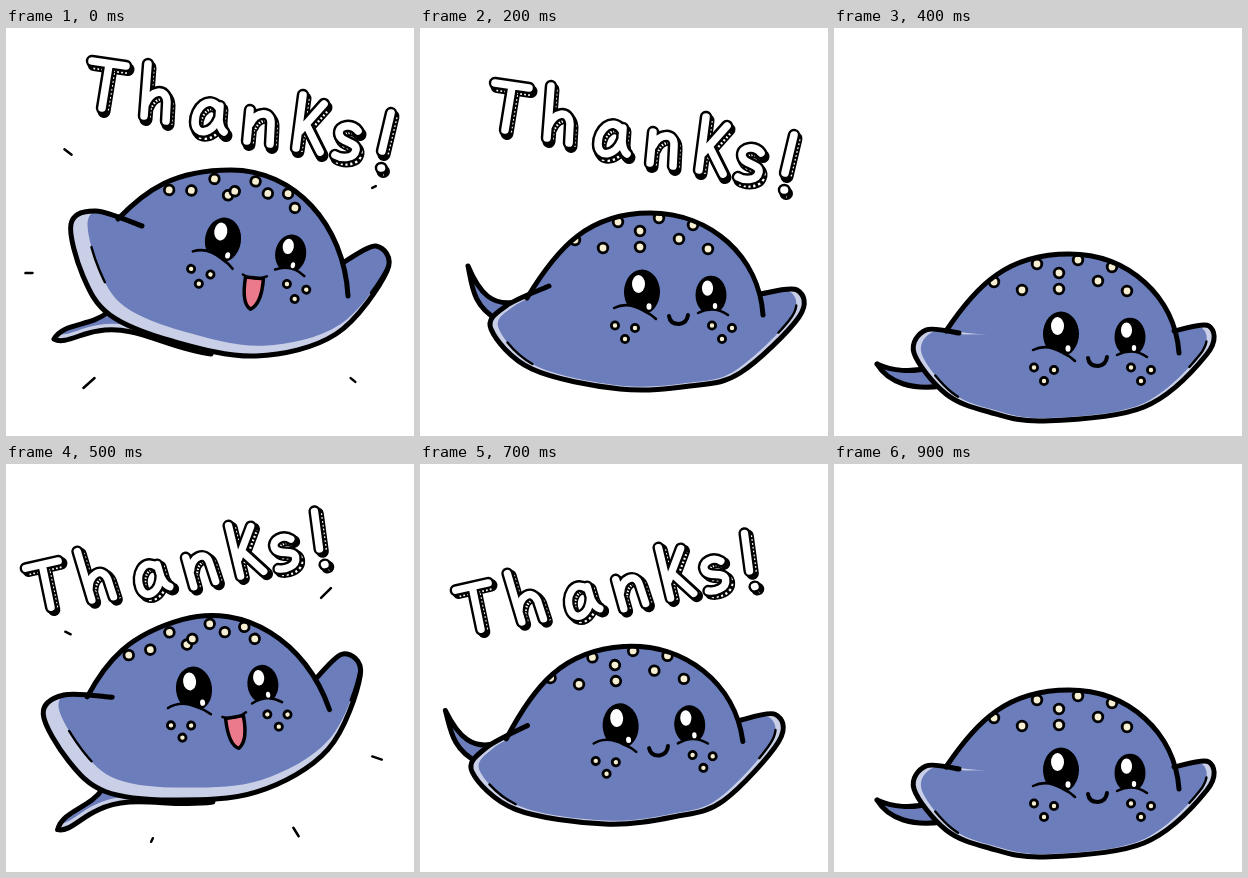
These frames come from a looping animation (408 px wide and 408 px high, 1000 ms). An HTML page:

```html
<!DOCTYPE html>
<html lang="en">
<head>
<meta charset="utf-8">
<title>Thanks!</title>
<style>
html, body { margin: 0; width: 100%; height: 100%; overflow: hidden; background: #fff; }
svg { display: block; width: 100%; height: 100%; }
path { stroke-linecap: round; stroke-linejoin: round; }
.line { fill: none; stroke: #000; stroke-width: 5; }
.thin { fill: none; stroke: #000; stroke-width: 2.5; }
.blue { fill: #6b7dbb; }
.pale { fill: #c9cfe6; }
.spot { fill: #f6efd2; stroke: #000; stroke-width: 2.8; }
.mouth { fill: #ea7a8c; stroke: #000; stroke-width: 3.5; }
.crease { stroke-dasharray: 7 56 7 100; stroke-dashoffset: -19; }
.cell { visibility: hidden; animation: show 1s step-end infinite; }
@keyframes show {
  0% { visibility: visible; }
  10%, 100% { visibility: hidden; }
}
</style>
</head>
<body>
<svg id="stage" viewBox="0 0 408 408" role="img" aria-label="Thanks!"></svg>
<script>
const path = (d, cls, more = '') => `<path class="${cls}" d="${d}" ${more}/>`;
const oval = (x, y, rx, ry, fill) => `<ellipse cx="${x}" cy="${y}" rx="${rx}" ry="${ry}" fill="${fill}"/>`;
const spot = (x, y, r) => `<circle class="spot" cx="${x}" cy="${y}" r="${r}"/>`;
const group = (move, body) => `<g transform="${move}">${body}</g>`;

// Smooth open curve through key points
function curve(text) {
  const n = text.split(' ').map(Number), p = [];
  for (let i = 0; i < n.length; i += 2) p.push([n[i], n[i + 1]]);
  let d = `M${p[0]}`;
  for (let i = 0; i < p.length - 1; i++) {
    const a = p[i - 1] || p[i], b = p[i], c = p[i + 1], e = p[i + 2] || c;
    const near = b.map((v, k) => v + (c[k] - a[k]) / 6);
    const far = c.map((v, k) => v - (e[k] - b[k]) / 6);
    d += `C${near} ${far} ${c}`;
  }
  return d;
}

// Back of the ray: left foot, top, right foot
function arch([x0, y0], [x, y], [x1, y1]) {
  const w = x - x0;
  return `M${x0} ${y0}C${x0 + w * .25} ${y0 - (y0 - y) * .6} ${x - w * .5} ${y} ${x} ${y}` +
    `C${x + (x1 - x) * .54} ${y} ${x1 - 4} ${y1 - (y1 - y) * .57} ${x1} ${y1}`;
}

const low = {
  tail: 'M43 336C58 343 78 345 97 339L108 358C80 362 55 356 43 336',
  wing: '125 305 92 302 80 325 112 366 155 384 210 393 310 379 373 326 375 298 340 303',
  back: [[112, 303], [235, 226], [345, 325]],
  face: [227, 306, 0]
};
const poses = {
  up: {
    tail: 'M48 311C58 294 85 299 102 284L205 326C160 320 130 296 92 303C75 305 58 317 48 311',
    wing: '136 198 90 183 65 196 77 248 104 287 166 313 250 328 330 306 381 243 370 218 338 234',
    back: [[112, 191], [225, 142], [342, 268]],
    face: [217, 212, 9], open: true
  },
  glide: {
    tail: 'M43 282C58 298 85 297 104 297L215 336C130 334 60 325 43 282',
    wing: '126 217 85 208 57 222 75 270 105 299 172 325 270 333 330 318 378 250 368 230 335 242',
    back: [[100, 214], [218, 154], [340, 278]],
    face: [213, 223, 8], open: true
  },
  fall: {
    tail: 'M48 238C58 262 72 284 106 271L78 292C52 278 52 256 48 238',
    wing: '129 258 86 278 71 301 112 341 200 361 270 358 320 345 379 289 377 262 340 266',
    back: [[107, 270], [230, 185], [343, 287]],
    face: [222, 264, 0]
  },
  sink: { ...low, tail: 'M43 300C58 322 75 325 97 325L108 346C75 350 50 332 43 300' },
  low
};

// Face and spots are laid out around the centre of the left eye
const place = ([x, y, deg]) => `translate(${x} ${y}) rotate(${deg})`;

function backSpots(open) {
  const front = [[-39, -44], [-2, -45], [37, -53], [66, -43]];
  const rear = [[-67, -52], [-24, -70], [-2, -61], [17, -74], [51, -67]];
  const [dx, dy] = open ? [6, 11] : [0, 0];
  return [...front, ...rear.map(([x, y]) => [x + dx, y + dy])].map(([x, y]) => spot(x, y, 4.8)).join('');
}

function face(open) {
  const eye = (x, y, k) => oval(x, y, 18 * k, 22.5 * k, '#000') + oval(x - 3.5, y - 8 * k, 6.5 * k, 9 * k, '#fff');
  const cheek = d => path(d + 'l-12 8h-16z', 'blue') + path(d, 'thin');
  const freckles = x => spot(x, 33.5, 3.6) + spot(x + 20, 36, 3.6) + spot(x + 10, 47, 3.6);
  const mouth = open
    ? path('M28 33Q28 60 38 64Q48 57 46 32Z', 'mouth') + path('M25 31Q37 36 49 29', 'thin')
    : path('M27 24Q28 32 37 32Q45 31 46 23', 'thin', 'style="stroke-width:4"');
  return eye(0, 0, 1) + eye(69, 3, .86) +
    cheek('M-28 16Q-14 9 2 19Q9 22 14 27') + cheek('M56 21Q72 13 86 23') +
    oval(7, 14.5, 2.5, 3.2, '#fff') + oval(73, 14, 2.2, 3, '#fff') +
    freckles(-27) + freckles(70) + mouth;
}

function ray(name, p) {
  const wing = curve(p.wing), back = arch(...p.back);
  const [x, y] = [p.face[0] + 5, p.face[1] + 30];
  const [dx, dy] = p.open ? [9, -6] : [0, 0];
  const inset = `transform="translate(${x + dx} ${y + dy}) scale(.95) translate(${-x} ${-y})"`;
  const clip = (part, d, body) =>
    `<clipPath id="${name}-${part}"><path d="${d}"/></clipPath><g clip-path="url(#${name}-${part})">${body}</g>`;
  return `<g id="${name}">` +
    path(p.tail, 'pale') + clip('tail', p.tail, path(p.tail, 'blue', `transform="translate(0 ${dy})"`)) +
    path(p.tail, 'line') +
    path(wing, 'pale') + clip('wing', wing, path(wing, 'blue', inset)) +
    path(wing, 'thin crease', `pathLength="100" ${inset}`) +
    path(back, 'blue') + clip('back', back, group(place(p.face), backSpots(p.open))) +
    path(back, 'line') + path(wing, 'line') + group(place(p.face), face(p.open)) + '</g>';
}

// Hollow lettering with a hatched drop edge
const letters = [
  'M86 33L120 38M103 37L96 80',
  'M142 36L138 88M139 77C145 62 160 59 161 74L160 93',
  'M213 80C203 66 189 80 189 94C189 108 206 107 213 90M214 78L213 92Q214 101 218 104',
  'M244 82L241 113M244 96C250 83 266 82 265 96L264 116',
  'M297 67L290 120M294 103L318 76M301 98L314 124',
  'M352 103C346 95 333 97 333 105C333 115 351 113 350 122C348 132 334 130 329 127',
  'M385 85L376 123M375 140h.5'
];
function lettering() {
  const draw = (d, w, color, more = '') => path(d, '', `fill="none" stroke="${color}" stroke-width="${w}" ${more}`);
  const edge = 'transform="translate(2 3.5)"';
  return '<g id="word">' + letters.map(d =>
    draw(d, 13, '#000', edge) +
    draw(d, 9.5, '#fff', edge + ' style="stroke-linecap:butt" stroke-dasharray="1.8 2.2"') +
    draw(d, 12.5, '#000') + draw(d, 7.6, '#fff')).join('') + '</g>';
}

// Short dash pointing away from the middle
function spark(x, y, len) {
  const deg = Math.atan2(y - 240, x - 210) * 180 / Math.PI;
  return path(`M${-len / 2} 0h${len}`, 'thin', `transform="${place([x, y, deg])}"`);
}

const use = (id, move) => `<use href="#${id}" transform="${move}"/>`;
const turn = (x, y, deg, px, py) => `translate(${x} ${y}) rotate(${deg}) translate(${-px} ${-py})`;
const sink = use('sink', 'translate(3 -12)');

// The word drops a little each step, leaning right in one jump and left in the next
const right = i => use('word', `translate(${-5.5 * i} ${11 * i})`);
const left = i => use('word', `translate(${41 + 8 * i} ${122 + 11 * i}) rotate(-21) scale(.97) translate(-100 -58)`);

const cells = [
  use('up', '') + right(0) +
    spark(62, 124, 9) + spark(368, 159, 4) + spark(23, 245, 7) + spark(83, 355, 15) + spark(347, 352, 6),
  use('glide', '') + right(1),
  use('fall', '') + right(2),
  sink + right(3),
  use('low', ''),
  use('up', turn(188, 225, -15.5, 217, 212)) + left(0) +
    spark(62, 169, 6) + spark(320, 129, 14) + spark(371, 294, 10) + spark(290, 368, 10) + spark(146, 376, 4),
  use('glide', turn(188, 226, -9.5, 213, 222)) + left(1),
  use('fall', turn(196, 202, -3.5, 221, 204)) + left(2),
  sink + left(3),
  use('low', '')
];

document.getElementById('stage').innerHTML =
  '<defs>' + Object.entries(poses).map(([name, p]) => ray(name, p)).join('') + lettering() + '</defs>' +
  cells.map((c, i) => `<g class="cell" style="animation-delay:${i ? i * 100 - 1000 : 0}ms">${c}</g>`).join('');
</script>
</body>
</html>
```
